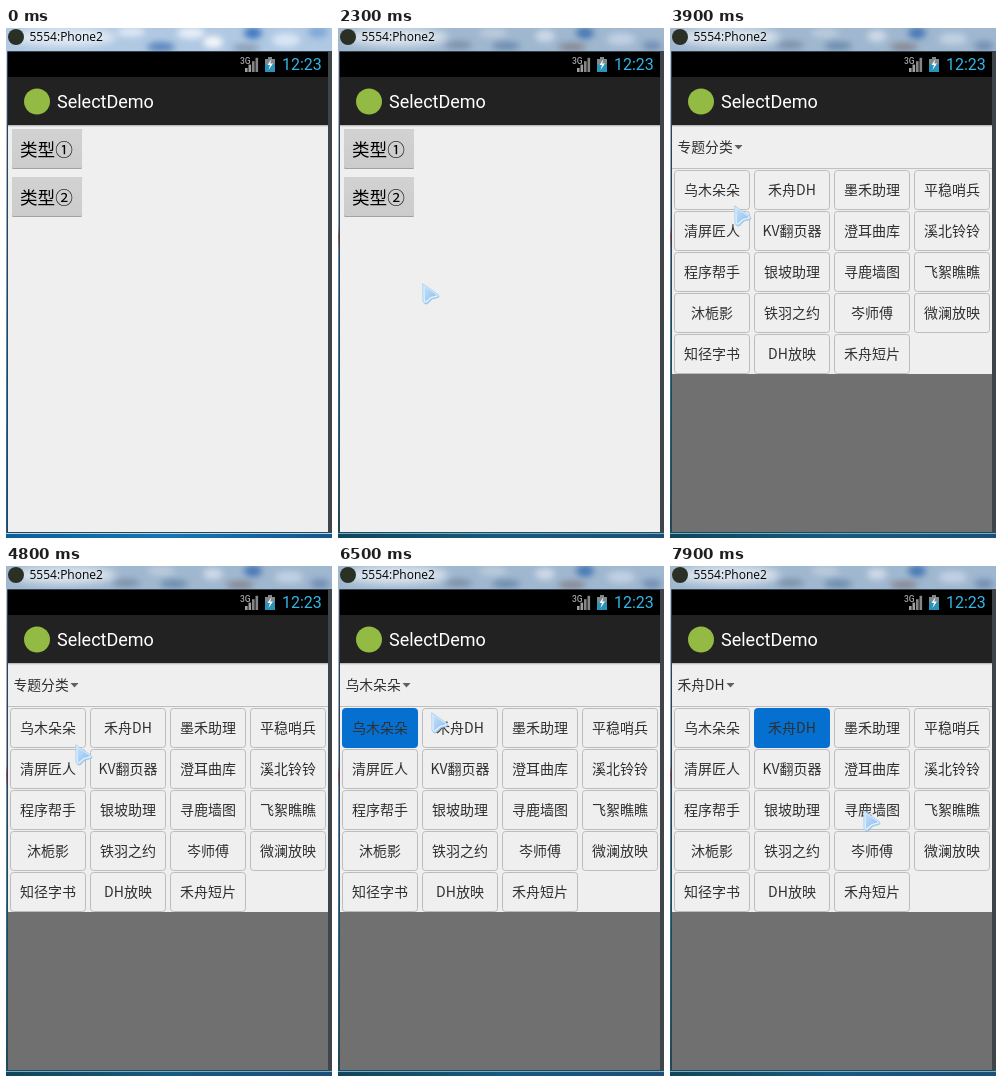
Write an HTML page that moves like this. It is 326 px wide and 510 px high and loops after 8 s.

```html
<!DOCTYPE html>
<html lang="zh-CN">
<head>
<meta charset="utf-8">
<title>SelectDemo</title>
<style>
  html, body { margin: 0; width: 100%; height: 100%; overflow: hidden; background: #efefef; }
  svg { display: block; width: 326px; height: 510px; }
  text { font-family: "Noto Sans CJK SC", "Noto Sans CJK", sans-serif; fill: #303030; }
  .ui { font-family: Roboto, sans-serif; }
  .caption { font: 12px "Open Sans", sans-serif; fill: #000; }
  .button { font-size: 17.6px; fill: #000; }
  .label { font-size: 13.8px; }
  .cell { font-size: 14px; text-anchor: middle; }
</style>
</head>
<body>
<svg viewBox="0 0 326 510">
  <defs>
    <filter id="soft" x="-20%" y="-80%" width="140%" height="260%"><feGaussianBlur stdDeviation="4"/></filter>
    <filter id="haze" x="-60%" y="-60%" width="220%" height="220%"><feGaussianBlur stdDeviation="3"/></filter>
    <linearGradient id="side" x2="0" y2="1">
      <stop offset="0" stop-color="#c3d3e8"/><stop offset=".4" stop-color="#7ba4cc"/>
      <stop offset=".7" stop-color="#2f7fb4"/><stop offset="1" stop-color="#0b5c92"/>
    </linearGradient>
    <linearGradient id="sideDim" x2="0" y2="1">
      <stop offset="0" stop-color="#b4c3da"/><stop offset=".36" stop-color="#7d9cbd"/>
      <stop offset=".38" stop-color="#a04a52"/><stop offset=".41" stop-color="#5f8db0"/>
      <stop offset=".7" stop-color="#1e7391"/><stop offset="1" stop-color="#0f4a60"/>
    </linearGradient>
    <linearGradient id="foot">
      <stop offset="0" stop-color="#0b5f99"/><stop offset=".5" stop-color="#1676b4"/><stop offset="1" stop-color="#15568c"/>
    </linearGradient>
    <linearGradient id="footDim">
      <stop offset="0" stop-color="#10465a"/><stop offset=".5" stop-color="#175a80"/><stop offset="1" stop-color="#1b4f78"/>
    </linearGradient>
    <linearGradient id="button" x2="0" y2="1">
      <stop offset="0" stop-color="#d2d2d2"/><stop offset="1" stop-color="#cccccc"/>
    </linearGradient>
    <linearGradient id="arrow" x2="1" y2="1">
      <stop offset="0" stop-color="#c4e1fa"/><stop offset="1" stop-color="#8abdf0"/>
    </linearGradient>
    <clipPath id="strip"><rect width="326" height="23"/></clipPath>
  </defs>

  <g id="glass"></g>
  <g id="glassDim"></g>
  <g clip-path="url(#strip)">
    <ellipse cx="58" cy="9" rx="52" ry="9" fill="#fff" opacity=".65" filter="url(#soft)"/>
  </g>
  <circle cx="10" cy="9" r="8" fill="#2b3024"/>
  <text class="caption" x="23.5" y="13">5554:Phone2</text>

  <path d="M1.5 504.5V23.5H322M1 504.5H322" fill="none" stroke="#34424f"/>
  <rect x="322" y="23" width="4" height="482" fill="#40454a"/>
  <rect x="2" y="24" width="320" height="25" fill="#000"/>
  <rect x="2" y="49" width="320" height="48" fill="#222"/>
  <rect x="2" y="97" width="320" height="407" fill="#efefef"/>

  <text class="ui" x="234" y="35.500" font-size="8.500" font-weight="500" style="fill:#a5a5a5">3G</text>
  <g id="signal"></g>
  <path d="M262 29h4v2h3v13h-10v-13h3z" fill="#7e8a90"/>
  <path d="M259 36h10v8h-10z" fill="#2b92b8"/>
  <path d="M265.5 31l-4 6h2.5l-1.5 5 4.5-6.500h-2.800z" fill="#fff"/>
  <text class="ui" x="276" y="42" font-size="16" style="fill:#33b5e5">12:23</text>

  <circle cx="31" cy="73.500" r="13" fill="#93bb43"/>
  <text class="ui" x="51" y="80" font-size="18" style="fill:#fff">SelectDemo</text>

  <g id="home"></g>
  <g id="list">
    <rect x="2" y="97" width="320" height="407" fill="#efefef"/>
    <text id="label" class="label" x="7.500" y="124"></text>
    <path id="caret" d="M0 117h8l-4 4.500z" fill="#606060"/>
    <rect x="2" y="140" width="320" height="1" fill="#bfbfbf"/>
    <g id="popup">
      <rect x="2" y="141" width="320" height="205" fill="#efefef"/>
      <rect x="2" y="346" width="320" height="158" fill="#707070"/>
    </g>
  </g>
  <rect x="2" y="97" width="320" height="1" fill="#bcbcbc"/>
  <rect x="2" y="98" width="320" height="1" fill="#dedede"/>

  <g id="cursor">
    <path d="M1 1.500L16 11.500Q18 13.500 15 14.500L9.500 16 5 20.500Q1.500 22 1 18z" fill="#6ea6d6" opacity=".6" transform="translate(.6 .6)"/>
    <path d="M.8 .8L16 11.500Q17.500 13.500 15 14.300L9.500 15.500 4.500 20Q1.500 21 1 18z" fill="#e2f1fd" stroke="#a3cdf0" stroke-width=".9"/>
    <path d="M2.300 3L15 12.300 8.800 14 3 18.800z" fill="url(#arrow)"/>
  </g>
</svg>
<script>
const LOOP = 8000, STEP = 100;
const NS = 'http://www.w3.org/2000/svg';
const $ = id => document.getElementById(id);

function add(parent, tag, attrs, text) {
  const el = document.createElementNS(NS, tag);
  for (const k in attrs) el.setAttribute(k, attrs[k]);
  if (text) el.textContent = text;
  return parent.appendChild(el);
}

const rect = (parent, x, y, width, height, fill, more) =>
  add(parent, 'rect', { x, y, width, height, fill, ...more });

// Window glass: blurred desktop behind the frame, in a bright and a dim state
function glass(g, base, blobs, side, foot, line) {
  rect(g, 0, 0, 326, 510, base);
  const strip = add(g, 'g', { 'clip-path': 'url(#strip)' });
  for (const [cx, cy, rx, ry, fill] of blobs)
    add(strip, 'ellipse', { cx, cy, rx, ry, fill, filter: 'url(#haze)' });
  rect(g, 0, 23, 2, 487, `url(#${side})`);
  rect(g, 0, 505, 326, 5, `url(#${foot})`);
  rect(g, 0, 505, 326, 1, line);
}

glass($('glass'), '#b0c8e2', [
  [125, 4, 14, 5, '#dfe8f4'], [155, 19, 14, 5, '#5b87bd'], [185, 5, 14, 6, '#e6eef8'],
  [207, 14, 10, 6, '#f4f7fb'], [247, 5, 9, 6, '#3f78c0'], [240, 20, 14, 4, '#8a9cb4'],
  [280, 12, 14, 7, '#d7e6f5'], [312, 4, 10, 6, '#7fa9d6']
], 'side', 'foot', '#a6dcf2');

glass($('glassDim'), '#9fb7cf', [
  [120, 17, 14, 4, '#7b8fa8'], [155, 5, 14, 5, '#bccbdc'], [168, 18, 14, 4, '#6a89ab'],
  [207, 8, 10, 6, '#ced9e8'], [247, 5, 9, 6, '#4a78b4'], [234, 19, 14, 4, '#85868f'],
  [283, 11, 14, 6, '#c2d1e4'], [314, 18, 10, 5, '#738fb4']
], 'sideDim', 'footDim', '#62b4d0');

for (let i = 0; i < 4; i++)
  rect($('signal'), 239 + i * 3.5, 40 - i * 3.4, 2.6, 4 + i * 3.4, i < 2 ? '#a0a0a0' : '#858585');

['类型①', '类型②'].forEach((name, i) => {
  const y = 101 + i * 48, home = $('home');
  rect(home, 6, y, 70, 40, '#a2a2a2', { rx: 1.5 });
  rect(home, 6, y, 70, 39, 'url(#button)', { rx: 1.5 });
  add(home, 'text', { class: 'button', x: 14, y: y + 26.5 }, name);
});

const names = ('乌木朵朵 禾舟DH 墨禾助理 平稳哨兵 清屏匠人 KV翻页器 澄耳曲库 溪北铃铃 程序帮手 银坡助理 ' +
  '寻鹿墙图 飞絮瞧瞧 沐栀影 铁羽之约 岑师傅 微澜放映 知径字书 DH放映 禾舟短片').split(' ');

const cells = names.map((name, i) => {
  const x = 4 + i % 4 * 80, y = 142 + Math.floor(i / 4) * 41;
  const box = rect($('popup'), x + .5, y + .5, 75, 39, '#efefef', { rx: 3 });
  add($('popup'), 'text', { class: 'cell', x: x + 38, y: y + 25 }, name);
  return box;
});

// time, x, y of the pointer tip
const path = [
  [300, 310, 440], [1100, 74, 166], [1300, 74, 166], [1400, 78, 171], [1500, 78, 171],
  [1600, 72, 167], [1700, 72, 167], [2300, 84, 255], [2500, 46, 130], [2700, 44, 140],
  [3100, 50, 148], [3300, 52, 120], [3400, 52, 120], [3500, 51, 119], [3600, 51, 119],
  [4100, 72, 215], [4500, 49, 169], [4600, 49, 169], [4800, 69, 178], [5000, 69, 178],
  [5300, 45, 158], [5600, 82, 172], [5800, 82, 172], [5900, 90, 175], [6200, 58, 117],
  [6600, 104, 155], [6800, 104, 155], [7300, 53, 111], [7400, 55, 113], [7500, 55, 113],
  [7900, 193, 244]
];

// time, label, caret x, popup open, chosen cell
const states = [
  [0, '专题分类', 64, false, -1], [3700, '专题分类', 64, true, -1],
  [5400, names[0], 64, false, 0], [6300, names[0], 64, true, 0],
  [6600, names[1], 56, false, 1], [7600, names[1], 56, true, 1]
];

const ramp = (t, from, to) => Math.min(1, Math.max(0, (t - from) / (to - from)));

function pointAt(t) {
  const i = path.findIndex(p => p[0] > t);
  if (i < 0) return path[path.length - 1].slice(1);
  if (i === 0) return path[0].slice(1);
  const [t0, x0, y0] = path[i - 1], [t1, x1, y1] = path[i];
  const k = ramp(t, t0, t1);
  return [Math.round(x0 + (x1 - x0) * k), Math.round(y0 + (y1 - y0) * k)];
}

function draw(t) {
  $('glassDim').setAttribute('opacity', ramp(t, 200, 1100));
  $('list').setAttribute('opacity', ramp(t, 2500, 2700));

  const [, label, caretX, open, chosen] = states.filter(s => s[0] <= t).pop();
  $('label').textContent = label;
  $('caret').setAttribute('transform', `translate(${caretX + .5} 0)`);
  $('popup').setAttribute('display', open ? 'inline' : 'none');
  cells.forEach((box, i) => {
    box.setAttribute('fill', i === chosen ? '#0570d0' : '#efefef');
    box.setAttribute('stroke', i === chosen ? '#0570d0' : '#bcbcbc');
  });

  const [x, y] = pointAt(t);
  $('cursor').setAttribute('display', t < path[0][0] ? 'none' : 'inline');
  $('cursor').setAttribute('transform', `translate(${x} ${y})`);
}

const start = performance.now();
let shown = -1;
function tick() {
  const t = Math.floor((performance.now() - start) % LOOP / STEP) * STEP;
  if (t !== shown) draw(shown = t);
  requestAnimationFrame(tick);
}
tick();
</script>
</body>
</html>
```
